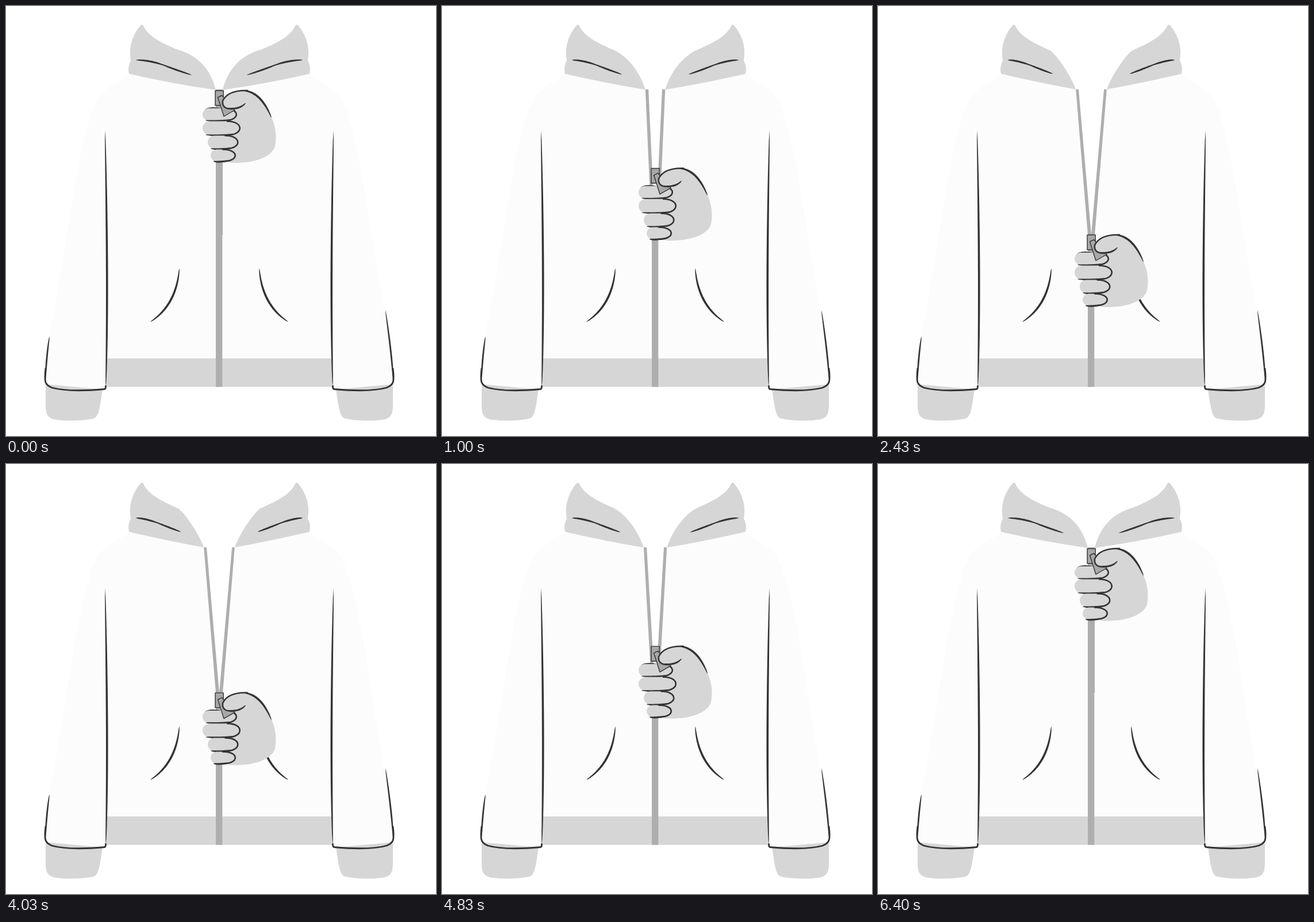
An HTML page with a canvas for the animation above (8010 ms loop, 748 by 748 pixels).

```html
<!DOCTYPE html>
<html lang="en">
<head>
<meta charset="utf-8">
<title>Zip hoodie</title>
<style>
html, body { margin: 0; width: 100%; height: 100%; overflow: hidden; background: #fff; }
canvas { display: block; width: 100vw; height: 100vh; }
</style>
</head>
<body>
<canvas id="stage" width="748" height="748"></canvas>
<script>
const ctx = document.getElementById('stage').getContext('2d');
const LOOP = 8010, TRAVEL = 2175, DROP = 251;
const WIDTH = 742, MID = WIDTH / 2, ZIP_TOP = 146, ZIP_SPLIT = 398;
const WHITE = '#fff', CLOTH = '#fcfcfc', GREY = '#d6d6d6', TAPE = '#aeaeae', METAL = '#a8a8a8', INK = '#333';
const lerp = (a, b, k) => a + (b - a) * k;

function fill(d, color) {
  ctx.fillStyle = color;
  ctx.fill(new Path2D(d));
}

function line(d, width) {
  ctx.strokeStyle = INK;
  ctx.lineWidth = width;
  ctx.stroke(new Path2D(d));
}

function poly(color, ...pts) {
  fill('M' + pts.join(' ') + 'Z', color);
}

function mirrored(draw) {
  draw(false);
  ctx.save();
  ctx.translate(WIDTH, 0);
  ctx.scale(-1, 1);
  draw(true);
  ctx.restore();
}

// Pen stroke along a quadratic curve, thin at both ends
function brush(width, x0, y0, cx, cy, x1, y1) {
  const near = [], far = [], steps = 32;
  for (let i = 0; i <= steps; i++) {
    const t = i / steps, u = 1 - t;
    const x = u * u * x0 + 2 * u * t * cx + t * t * x1;
    const y = u * u * y0 + 2 * u * t * cy + t * t * y1;
    const dx = lerp(cx - x0, x1 - cx, t), dy = lerp(cy - y0, y1 - cy, t);
    const h = width / 2 * Math.sqrt(4 * t * u) / Math.hypot(dx, dy);
    near.push([x - dy * h, y + dx * h]);
    far.unshift([x + dy * h, y - dx * h]);
  }
  poly(INK, ...near, ...far);
}

// cubic-bezier(.62, 0, .24, 1)
function ease(x) {
  if (x <= 0) return 0;
  if (x >= 1) return 1;
  let lo = 0, hi = 1;
  for (let i = 0; i < 30; i++) {
    const s = (lo + hi) / 2, u = 1 - s;
    if (3 * s * u * (0.62 * u + 0.24 * s) + s * s * s < x) lo = s; else hi = s;
  }
  return lo * lo * (3 - 2 * lo);
}

function drawCloth() {
  mirrored(() => {
    fill('M214 118C208 128 168 140 158 164C122 240 112 390 76 570L68 640Q66 672 173 666V613H371.5V146Z', CLOTH);
    fill('M175 613H371.5V662.5H175Z', GREY);
    fill('M69 658V694C69 711 73 717 86 719.5Q120 724 153 717.5C163 713 164 690 168 667Z', GREY);
  });
  fill('M365 146H376.3V662.5H365Z', TAPE);
}

function drawOpening(d) {
  const outer = 365 - 0.083 * d, inner = MID - 0.088 * d;
  mirrored(() => {
    poly(WHITE, [outer, ZIP_TOP - 6], [MID, ZIP_TOP - 6], [MID, ZIP_SPLIT], [365, ZIP_SPLIT]);
    poly(TAPE, [outer, ZIP_TOP - 1], [inner, ZIP_TOP - 1], [MID, ZIP_SPLIT], [365, ZIP_SPLIT]);
  });
}

function drawHood(k) {
  const x = 365 - 21 * k, foldEnd = 323 - 19 * k, foldMid = (226 + foldEnd) / 2;
  const rim = [x - 30, lerp(86, 90, k), x - 9, lerp(110, 120, k), x, ZIP_TOP - k];
  const shape = `M238.5 33.5C247 53 270 64 ${lerp(296, 301, k)} ${lerp(75, 78, k)}` +
    `C${rim}Q288 135 214 118Q211 107 217 95C213 73 219 52 233 35Q236 31 238.5 33.5Z`;
  mirrored(() => {
    fill(shape, GREY);
    brush(3.2, 226, 94, foldMid - 24, 94, foldMid + 3, 104);
    brush(3, foldMid - 5, 101, foldMid + 20, 111, foldEnd, 120 - 2 * k);
  });
}

function drawSeams() {
  mirrored(right => {
    brush(3.6, 172.3, 216, 178.5, 500, 173.5, 665);
    brush(3.6, 301.5, 456, 297, 520, 251, 549.5);
    brush(2.8, right ? 82 : 75.5, right ? 529 : 575, 70, 612, 68.5, 652);
    line('M69 630C66 655 68 659 80 664Q110 672 171 666.5Q174 666 173.5 660', 2.8);
  });
}

function drawFinger(left, top, tip, bottom) {
  const r = (bottom - top) / 2, bend = tip - 22;
  ctx.fillStyle = GREY;
  ctx.beginPath();
  ctx.roundRect(left, top, tip - left, bottom - top, r);
  ctx.fill();
  line(`M${bend} ${top}C${tip + 7} ${top} ${tip + 7} ${bottom} ${bend} ${bottom}`, 2.6);
  brush(3.2, tip - 10, bottom - 2, bend - 8, bottom + 2, left + 5, bottom - 0.5);
}

function drawHand(d) {
  ctx.save();
  ctx.translate(0, d);
  ctx.lineCap = ctx.lineJoin = 'round';

  const slider = 'M364 147.2H378.2V173H364Z';
  fill(slider, METAL);
  line(slider, 1.4);

  fill('M379 162Q388 146 423 147.5C444 152 453 174 461 192Q473 217 468 244C462 264 428 275 388 272.5L380 266Z', GREY);
  brush(2.8, 346, 181, 353, 176, 374, 178.5);
  drawFinger(342, 178, 401, 199.5);
  drawFinger(342, 200.5, 407, 224.5);
  drawFinger(351, 225.5, 403.5, 248.5);
  drawFinger(356, 249.5, 399, 270.5);

  const tab = 'M368.5 159L375.5 155.5L398 181L379 192Z';
  fill(tab, METAL);
  line(tab, 1.4);

  fill('M377 165Q386 146 420 147Q440 153 417 168.5Q407 179 395 179Q375 180 377 165Z', GREY);
  line('M395 179Q375 180 377 165Q386 146 420 147', 2.5);
  brush(3.6, 410, 147, 443, 147, 462, 195);
  brush(3, 386, 177.5, 406, 181, 417, 168.5);
  ctx.restore();
}

function draw(ms) {
  // Pose advances twenty times a second
  const time = 100 * Math.floor(ms / 100) + (ms % 100 >= 30 ? 50 : 0);
  const k = ease(time / TRAVEL) - ease((time - 4000) / TRAVEL);
  ctx.fillStyle = WHITE;
  ctx.fillRect(0, 0, 748, 748);
  drawCloth();
  drawOpening(DROP * k);
  drawHood(k);
  drawSeams();
  drawHand(DROP * k);
}

const start = performance.now();
function tick(now) {
  draw(Math.max(0, now - start) % LOOP);
  requestAnimationFrame(tick);
}
draw(0);
requestAnimationFrame(tick);
</script>
</body>
</html>
```
